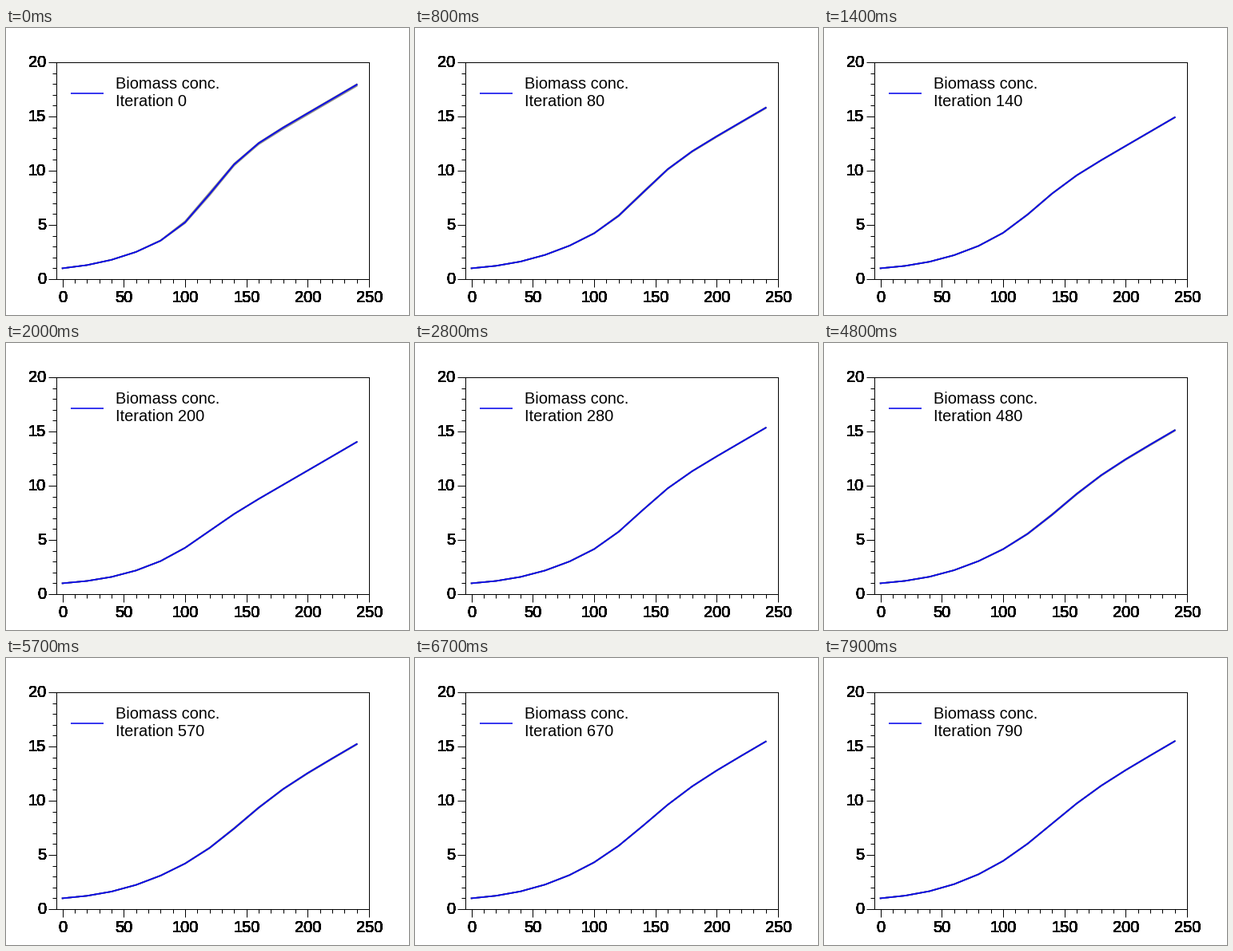
A matplotlib script that plays this animation: 504x360 px, repeating every 8000 ms.

```python
import numpy as np
import matplotlib.pyplot as plt
from matplotlib.animation import FuncAnimation
from matplotlib.ticker import MultipleLocator

W, H = 504, 360
LEFT, RIGHT, TOP, BOTTOM = 63, 454, 43, 315
FRAMES, INTERVAL = 80, 100
BLUE = "#0a0aec"

plt.rcParams["font.family"] = "Liberation Sans"
plt.rcParams["font.size"] = 20

hours = np.arange(0, 241, 20)
mids = hours[:-1] + 10

# step, growth onset (h), then peak (h), width (h) and height of the growth burst
step, *params = np.array([
    [0, 45, 121, 31, 1.60],
    [8, 54, 138, 32, 0.98],
    [20, 56, 115, 30, 0.42],
    [28, 56, 136, 33, 0.83],
    [40, 56, 147, 38, 0.62],
    [57, 54, 145, 38, 0.65],
    [79, 52, 137, 42, 0.63],
]).T

# Random walk pinned to zero at each key step
rng = np.random.default_rng(4)
walk = np.cumsum(rng.normal(0, .01, FRAMES))
walk -= np.interp(np.arange(FRAMES), step, walk[step.astype(int)])

shifts = rng.uniform(-1, 1, (10, 2))


def biomass(i, delay=0, gain=1):
    """Sum a logistic growth rate with a burst around its peak."""
    onset, peak, width, height = (np.interp(i, step, p) for p in params)
    rate = 1.32 / (1 + np.exp((onset - mids) / 28))
    burst = np.exp(-((mids - peak - delay) / width) ** 2)
    rate += (height + walk[i]) * gain * burst
    return 1 + np.concatenate([[0], np.cumsum(rate)])


fig = plt.figure(figsize=(W / 72, H / 72), dpi=72, facecolor="white")
ax = fig.add_axes([LEFT / W, 1 - BOTTOM / H, (RIGHT - LEFT) / W, (BOTTOM - TOP) / H])
ax.set(xlim=(-5, 250), ylim=(0, 20))
for axis, major, minor in ((ax.xaxis, 50, 10), (ax.yaxis, 5, 1)):
    axis.set_major_locator(MultipleLocator(major))
    axis.set_minor_locator(MultipleLocator(minor))
ax.tick_params(which="major", length=10, width=1, labelbottom=False, labelleft=False)
ax.tick_params(which="minor", length=5, width=1)
for spine in ax.spines.values():
    spine.set_linewidth(1)


def label(x, y, text, ha="left"):
    return fig.text(x / W, 1 - y / H, text, ha=ha, va="baseline")


# Stacked copies give the tick labels their heavy edges
for _ in range(16):
    for v in range(0, 251, 50):
        label(LEFT + 8 + v * (RIGHT - LEFT) / 255, 344, str(v), "center")
    for v in range(0, 21, 5):
        label(50, BOTTOM + 6 - v * (BOTTOM - TOP) / 20, str(v), "right")

label(137, 76, "Biomass conc.")
counter = label(137, 98, "")
fig.add_artist(plt.Line2D([80.5 / W, 121.5 / W], [1 - 82 / H] * 2,
                          color=BLUE, lw=1.6, solid_capstyle="butt"))

ghosts = [ax.plot([], [], color="#808080", alpha=.5, lw=1.6)[0] for _ in shifts]
line, = ax.plot([], [], color=BLUE, lw=1.8)


def draw(i):
    slack = np.cos(np.pi * i / 48) ** 2
    for ghost, (a, b) in zip(ghosts, shifts * slack):
        ghost.set_data(hours, biomass(i, 2.5 * a, 1 + .04 * b))
    line.set_data(hours, biomass(i))
    counter.set_text(f"Iteration {10 * i}")
    return [*ghosts, line, counter]


anim = FuncAnimation(fig, draw, frames=FRAMES, interval=INTERVAL,
                     repeat=True, repeat_delay=0)
plt.show()
```
